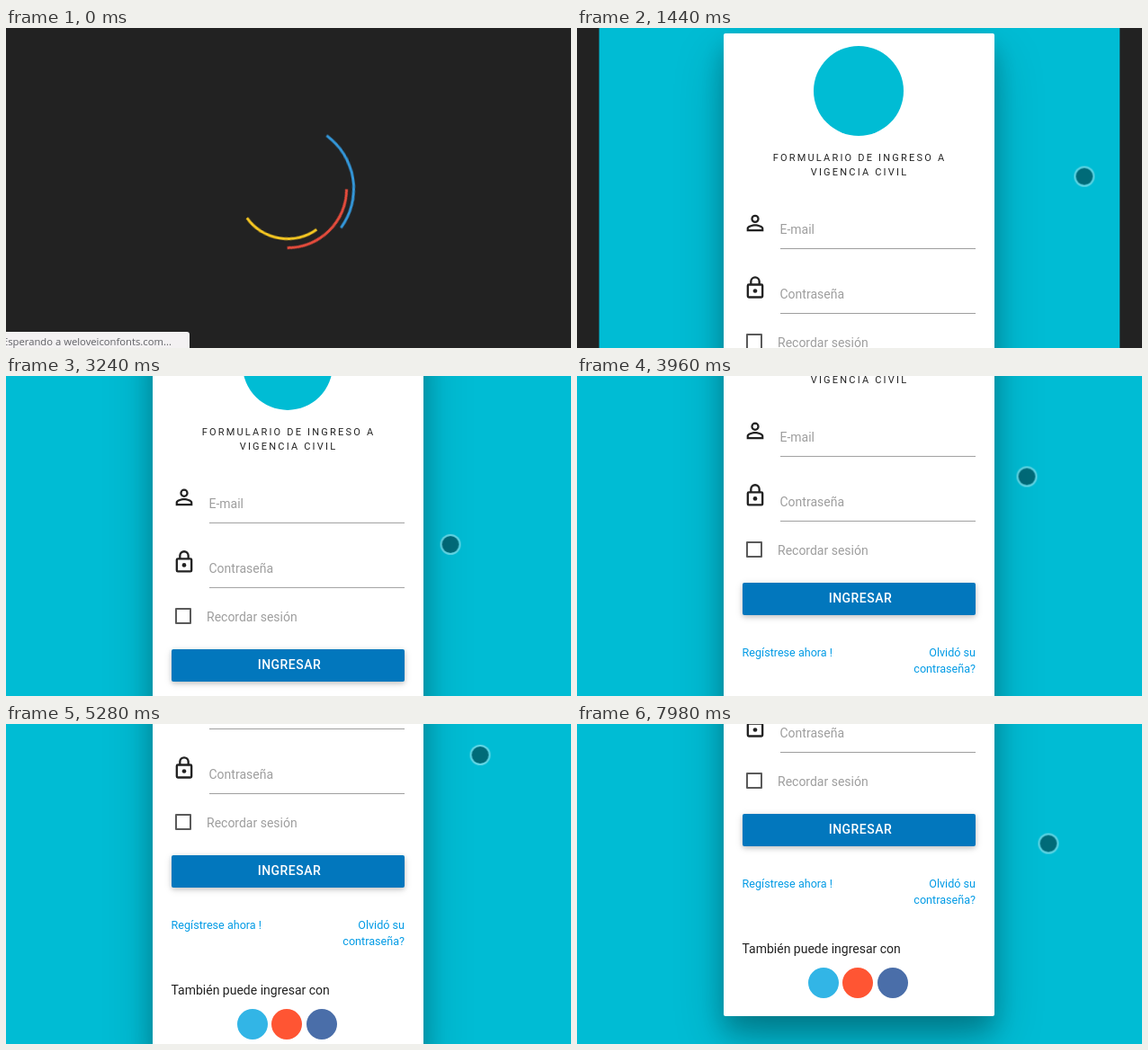
These frames come from a looping animation (628x356 px, 8000 ms). An HTML page:

```html
<!DOCTYPE html>
<html lang="es">
<head>
<meta charset="utf-8">
<title>Formulario de ingreso</title>
<style>
  :root { --cyan: #00bcd4; --dark: #222; --ink: rgba(0, 0, 0, .87); }
  * { box-sizing: border-box; }
  html, body { margin: 0; width: 100%; height: 100%; overflow: hidden; }
  body { background: var(--cyan); font: 14px/20px Roboto, sans-serif; color: var(--ink); }
  .stage { position: relative; width: 628px; height: 356px; overflow: hidden; background: var(--cyan); }
  .stage * { position: absolute; }
  .page, .panel, .loader, .status, .cursor { animation: 8s linear infinite; }

  /* Scrolling page */
  .page { inset: 0; animation-name: scroll; }
  .card {
    left: 163px; top: 6px; width: 301px; height: 605px;
    background: #fff; border-radius: 2px;
    box-shadow: 0 16px 28px rgba(0, 0, 0, .22), 0 25px 55px rgba(0, 0, 0, .21);
  }
  .logo { left: 263px; top: 20px; width: 100px; height: 100px; border-radius: 50%; background: var(--cyan); }
  .title {
    left: 163px; top: 137px; width: 302px; text-align: center; white-space: nowrap;
    font-size: 11px; line-height: 16px; letter-spacing: .2em;
  }
  .icon { left: 183.5px; width: 28px; height: 28px; fill: var(--ink); }
  .label { color: #9e9e9e; white-space: nowrap; }
  .line { left: 226px; width: 217px; height: 1px; background: #9e9e9e; }
  .check { left: 188px; top: 340px; width: 18px; height: 18px; border: 2px solid #5a5a5a; border-radius: 1px; }
  .button {
    left: 184px; top: 386px; width: 259px; height: 36px; padding-left: 3px;
    border-radius: 2px; background: #0277bd; color: #fff; text-align: center;
    font-weight: 500; line-height: 34px; letter-spacing: .5px;
    box-shadow: 0 2px 5px rgba(0, 0, 0, .16), 0 2px 10px rgba(0, 0, 0, .12);
  }
  .link { top: 455px; color: #039be5; font-size: 12.6px; line-height: 18px; white-space: nowrap; }
  .social { top: 557px; width: 34px; height: 34px; border-radius: 50%; }

  /* Preloader */
  .panel { top: 0; height: 356px; background: var(--dark); }
  .left { left: 0; width: 320px; animation-name: open-left; }
  .right { left: 306px; width: 322px; animation-name: open-right; }
  .loader { left: 238px; top: 104px; width: 150px; height: 150px; animation-name: fade; }
  .arc { border: 3px solid transparent; border-radius: 50%; animation: spin 8s linear infinite; }
  .outer { inset: 0; border-top-color: #3498db; --from: 81deg; --turn: 1440deg; }
  .middle { inset: 5px; border-top-color: #e74c3c; --from: 54deg; --turn: 960deg; }
  .inner { inset: 15px; border-top-color: #f9c922; --from: 108deg; --turn: 1920deg; }

  .status {
    left: 0; top: 338px; width: 204px; height: 18px; overflow: hidden;
    background: #f3f1f2; border-top-right-radius: 3px; animation-name: status;
  }
  .status span {
    left: -4px; top: 0; white-space: nowrap; color: #5f6065;
    font: 11.25px/21px "Open Sans", sans-serif;
  }
  .cursor {
    left: -11.5px; top: -11.5px; width: 23px; height: 23px; border-radius: 50%;
    border: 2px solid rgba(255, 255, 255, .38);
    background: rgba(0, 0, 0, .43) padding-box; animation-name: pointer;
  }

  @keyframes spin {
    from { transform: rotate(var(--from)); }
    to { transform: rotate(calc(var(--from) + var(--turn))); }
  }
  @keyframes fade {
    0%, 7.8% { opacity: 1; animation-timing-function: ease-out; }
    11.55%, 100% { opacity: 0; }
  }
  @keyframes status {
    0%, 7.5% { visibility: visible; }
    7.51%, 100% { visibility: hidden; }
  }
  @keyframes open-left {
    0%, 11.55% { transform: none; animation-timing-function: cubic-bezier(.645, .045, .355, 1); }
    20.3%, 100% { transform: translateX(-320px); }
  }
  @keyframes open-right {
    0%, 11.55% { transform: none; animation-timing-function: cubic-bezier(.645, .045, .355, 1); }
    20.3%, 100% { transform: translateX(322px); }
  }
  @keyframes scroll {
    0%, 30.5% { transform: none; }
    33% { transform: translateY(-16px); }
    40.5% { transform: translateY(-82px); }
    49.5% { transform: translateY(-156px); }
    57% { transform: translateY(-202px); }
    66% { transform: translateY(-240px); }
    72%, 74.25% { transform: translateY(-258px); }
    77.25%, 97.3% { transform: translateY(-266px); }
    99.75%, 100% { transform: translateY(-286px); }
  }
  @keyframes pointer {
    0%, 9% { transform: translate(580px, 132px); opacity: 0; }
    9.75% { transform: translate(580px, 132px); opacity: 1; }
    18% { transform: translate(563.5px, 164.5px); }
    21% { transform: translate(539px, 193px); }
    27.75%, 29.5% { transform: translate(488.5px, 283.5px); }
    33% { transform: translate(490px, 253px); }
    40.5% { transform: translate(493.5px, 187px); }
    49.5% { transform: translate(499.5px, 111.5px); }
    57% { transform: translate(512px, 68px); }
    66% { transform: translate(526.5px, 34px); }
    72%, 74.25% { transform: translate(536px, 18px); }
    77.25%, 92.9% { transform: translate(538.5px, 10px); }
    96%, 96.7% { transform: translate(524px, 160px); }
    99.75%, 100% { transform: translate(523.5px, 132.5px); opacity: 1; }
  }
</style>
</head>
<body>
<div class="stage">
  <div class="page">
    <div class="card"></div>
    <div class="logo"></div>
    <div class="title">FORMULARIO DE INGRESO A<br>VIGENCIA CIVIL</div>

    <svg class="icon" style="top:202.5px" viewBox="0 0 24 24">
      <circle cx="12" cy="8" r="3.05" fill="none" stroke="#222" stroke-width="1.9"/>
      <path fill-rule="evenodd" d="M12 13c-2.67 0-8 1.34-8 4v3h16v-3c0-2.66-5.33-4-8-4zm0 1.9c2.97 0 6.1 1.46 6.1 2.1v1.1H5.9V17c0-.64 3.13-2.1 6.1-2.1z"/>
    </svg>
    <div class="label" style="left:225.5px;top:214px">E-mail</div>
    <div class="line" style="top:245px"></div>

    <svg class="icon" style="top:274.5px" viewBox="0 0 24 24">
      <g fill="none" stroke="#222" stroke-width="2">
        <rect x="5" y="9" width="14" height="12" rx="1"/>
        <path d="M8 9V6a4 4 0 0 1 8 0v3"/>
      </g>
      <circle cx="12" cy="15" r="2"/>
    </svg>
    <div class="label" style="left:225.5px;top:286px">Contraseña</div>
    <div class="line" style="top:317px"></div>

    <div class="check"></div>
    <div class="label" style="left:223px;top:340px">Recordar sesión</div>
    <div class="button">INGRESAR</div>

    <div class="link" style="left:183.5px">Regístrese ahora !</div>
    <div class="link" style="right:185px;text-align:right">Olvidó su<br>contraseña?</div>

    <div style="left:183.5px;top:526px;white-space:nowrap">También puede ingresar con</div>
    <div class="social" style="left:257px;background:#32b5e6"></div>
    <div class="social" style="left:295px;background:#ff5533"></div>
    <div class="social" style="left:334px;background:#4a6ea9"></div>
  </div>

  <div class="panel left"></div>
  <div class="panel right"></div>
  <div class="loader">
    <div class="arc outer">
      <div class="arc middle"></div>
      <div class="arc inner"></div>
    </div>
  </div>

  <div class="status"><span>Esperando a weloveiconfonts.com...</span></div>
  <div class="cursor"></div>
</div>
</body>
</html>
```
